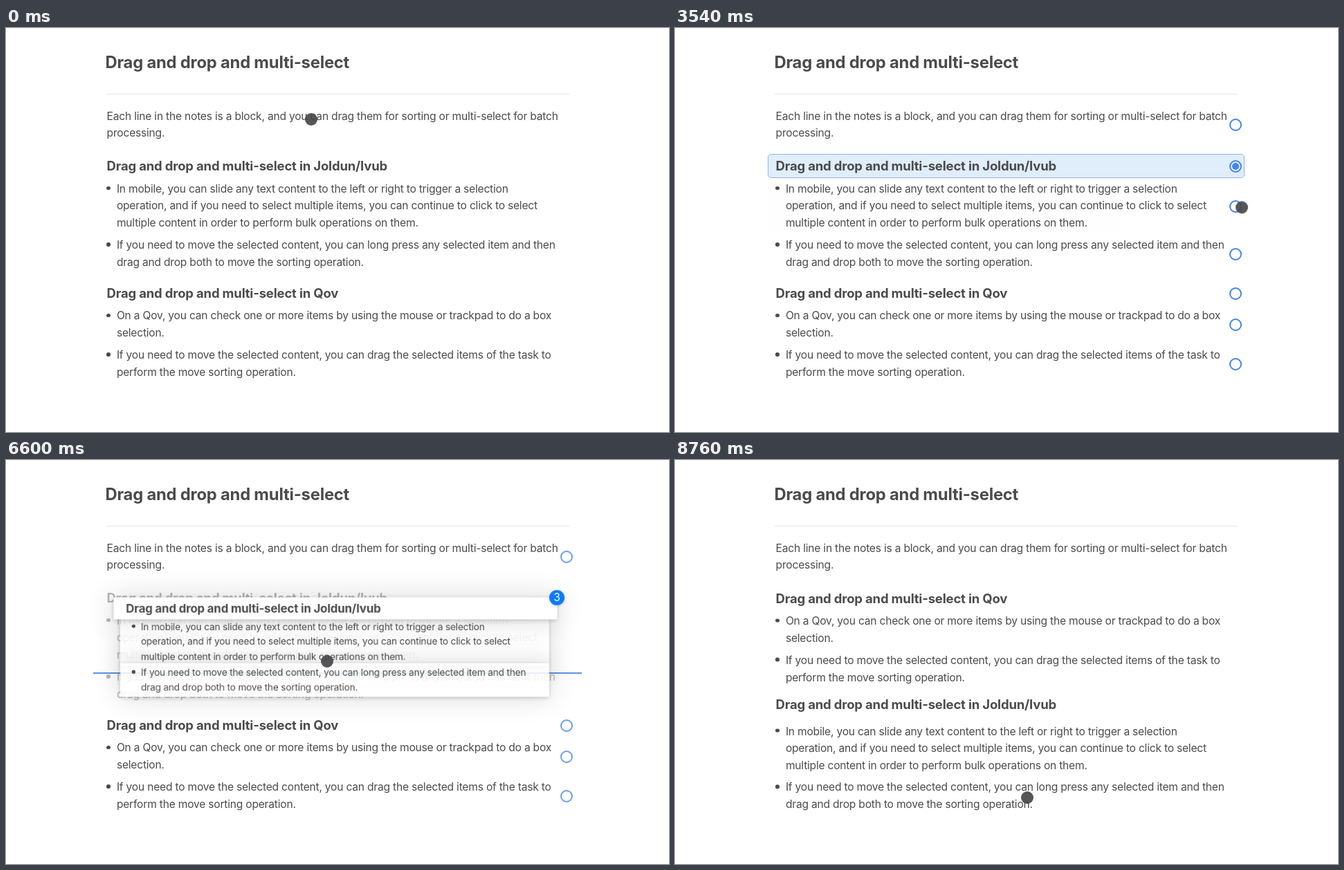
Write an HTML page that moves like this. It is 958 px wide and 584 px high and loops after 9 s.

```html
<!DOCTYPE html>
<html lang="en">
<head>
<meta charset="utf-8">
<title>Drag and drop and multi-select</title>
<style>
html, body { margin: 0; width: 100%; height: 100%; overflow: hidden; background: #fff; }
#stage {
  position: relative; width: 958px; height: 584px; overflow: hidden; background: #fff;
  color: #4b4b4d; font: 15.6px/24.6px Inter, "Liberation Sans", sans-serif;
  font-optical-sizing: none; letter-spacing: -.0138em; white-space: nowrap;
}
#stage *, #stage *::before, #stage *::after {
  box-sizing: border-box;
  animation-duration: 9s; animation-iteration-count: infinite; animation-timing-function: linear;
}
h1, h2 { margin: 0; font-weight: 700; letter-spacing: -.0095em; }
h1 { position: absolute; left: 143.5px; top: 35px; font-size: 23.8px; line-height: 30px; }
h2 { font-size: 18.5px; }
hr { position: absolute; left: 144px; top: 95px; width: 670px; height: 1px; margin: 0; border: 0; background: #e6e6e6; }

/* rows */
.row {
  position: absolute; left: 126px; width: 706px; top: var(--top); height: var(--h);
  display: flex; align-items: center; padding-left: 19.6px;
}
.text { position: relative; }
.item { padding-left: 33.9px; }
.item .text::before {
  content: ""; position: absolute; left: -14.6px; top: 8.2px;
  width: 5.6px; height: 5.6px; border-radius: 50%; background: currentColor;
}
.radio {
  position: absolute; left: 675px; top: 50%; width: 18px; height: 18px; margin-top: -9px;
  border: 2px solid #4483ee; border-radius: 50%; opacity: 0; animation-name: radios;
}
.move > .radio { animation-name: moveRadios; }
.move::before {
  content: ""; position: absolute; inset: 0 9px 0 8px; opacity: 0;
  border: 1px solid #8fb7ef; border-radius: 5px; background: #e0edfa; animation-name: var(--pick);
}
.move > .radio::after {
  content: ""; position: absolute; inset: 2px; border-radius: 50%;
  background: #4483ee; opacity: 0; animation-name: var(--pick);
}
.move > .text { animation-name: ghost; }
.swipe { animation-name: swipe; }
.stay { animation-name: rise; }

/* lifted copies */
.row.card {
  background: rgba(255, 255, 255, .85); opacity: 0; z-index: 1;
  animation-name: lift, show, shade;
}
.row.card.head { background: #fff; z-index: 3; }
.row.card.mid { animation-name: lift, show, shade, raise; }
.row.card.last { z-index: 2; }
.head { --a: translate(-3px, 15px) scale(.908); --b: translate(31.5px, 286.5px) scale(.44);
        --c: translate(3px, 167.5px) scale(.8995); --d: translate(0, 153.7px); }
.mid  { --a: translate(-4px, 5.5px) scale(.878); --b: translate(30px, 231.5px) scale(.277);
        --c: translate(2.5px, 166px) scale(.87); --d: translate(0, 159.5px); }
.last { --a: translate(-4px, -8.3px) scale(.878); --b: translate(30px, 161.7px) scale(.277);
        --c: translate(2.5px, 159.3px) scale(.87); --d: translate(0, 159.2px); }

#line { position: absolute; left: 126px; top: -1px; width: 706px; height: 2px; background: #5e92e4; animation-name: line; }
#badge {
  position: absolute; left: -11px; top: -11px; width: 22px; height: 22px; border-radius: 50%; z-index: 5;
  background: #0a7bff; color: #fff; text-align: center; line-height: 22px; letter-spacing: 0;
  box-shadow: 0 1px 4px rgba(0, 0, 0, .2); animation-name: badge, badgeShow;
}
#dot {
  position: absolute; left: -9px; top: -9px; width: 18px; height: 18px; border-radius: 50%; z-index: 6;
  background: rgba(72, 72, 75, .92); animation-name: dot;
}

@keyframes dot {
  0%, 6.67% { transform: translate(441px, 132px); animation-timing-function: ease-in; }
  9.33% { transform: translate(458px, 198px); animation-timing-function: ease-out; }
  10.67% { transform: translate(462px, 213px); animation-timing-function: ease-in-out; }
  12%, 14% { transform: translate(462px, 206px); }
  14.67%, 17.33% { transform: translate(462.3px, 206.3px); }
  18%, 20% { transform: translate(462px, 205.7px); }
  20.1%, 22% { transform: translate(462px, 205px); animation-timing-function: ease-in-out; }
  24.67% { transform: translate(412px, 207px); animation-timing-function: ease-in; }
  28% { transform: translate(557px, 214px); }
  32% { transform: translate(736px, 240px); animation-timing-function: ease-out; }
  37.33% { transform: translate(820px, 257px); }
  43.33% { transform: translate(817px, 264px); animation-timing-function: ease-in-out; }
  47.33% { transform: translate(816px, 303px); }
  49.33%, 53.33% { transform: translate(816px, 306px); animation-timing-function: ease-in-out; }
  60%, 72% { transform: translate(463px, 286px); }
  73.33% { transform: translate(464px, 291px); animation-timing-function: ease-in-out; }
  81.33%, 100% { transform: translate(509px, 488px); }
}
@keyframes swipe {
  0%, 22% { transform: none; animation-timing-function: ease-in-out; }
  24.67% { transform: translateX(-45px); animation-timing-function: ease-in; }
  28% { transform: translateX(-10px); animation-timing-function: ease-out; }
  30.67%, 100% { transform: none; }
}
@keyframes pick1 { 0%, 24.67% { opacity: 0; } 26%, 62.67% { opacity: 1; } 66%, 100% { opacity: 0; } }
@keyframes pick2 { 0%, 39.33% { opacity: 0; } 40.67%, 62.67% { opacity: 1; } 66%, 100% { opacity: 0; } }
@keyframes pick3 { 0%, 45.33% { opacity: 0; } 46.67%, 62.67% { opacity: 1; } 66%, 100% { opacity: 0; } }
@keyframes radios {
  0%, 24.67% { opacity: 0; } 26.67%, 66% { opacity: 1; }
  73.33% { opacity: .8; } 76%, 100% { opacity: 0; }
}
@keyframes moveRadios { 0%, 24.67% { opacity: 0; } 26.67%, 62.67% { opacity: 1; } 66%, 100% { opacity: 0; } }
@keyframes ghost {
  0%, 70% { opacity: 1; } 72%, 87.33% { opacity: .4; } 88.67%, 100% { opacity: 0; }
}
@keyframes rise {
  0%, 87.33% { transform: none; animation-timing-function: cubic-bezier(.3, .5, .3, 1); }
  92%, 100% { transform: translateY(-183.5px); }
}
@keyframes show { 0%, 62.67% { opacity: 0; } 64.67%, 100% { opacity: 1; } }
@keyframes raise { 0%, 87.33% { z-index: 1; } 87.34%, 100% { z-index: 4; } }
@keyframes lift {
  0%, 62.67% { transform: none; animation-timing-function: ease-out; }
  69%, 72% { transform: scale(1.02); }
  73.33% { transform: var(--a); animation-timing-function: ease-in-out; }
  81.33%, 87.33% { transform: var(--b); animation-timing-function: ease-out; }
  91.33% { transform: var(--c); animation-timing-function: ease-in-out; }
  97.33%, 100% { transform: var(--d); }
}
@keyframes shade {
  0%, 62.67%, 97.33%, 100% { box-shadow: 0 2px 7px rgba(0, 0, 0, 0), 0 0 42px 4px rgba(0, 0, 0, 0); }
  69%, 91.33% { box-shadow: 0 2px 7px rgba(0, 0, 0, .2), 0 0 42px 4px rgba(0, 0, 0, .13); }
}
@keyframes line {
  0%, 71.9% { transform: translateY(303px); opacity: 0; }
  72% { transform: translateY(303px); opacity: 1; }
  73.33% { transform: translateY(308px); animation-timing-function: ease-in-out; }
  81.33%, 87.33% { transform: translateY(506px); background: #5e92e4; opacity: 1; }
  91.33% { transform: translateY(512px); background: #ebebeb; opacity: 1; }
  94%, 100% { transform: translateY(512px); background: #ebebeb; opacity: 0; }
}
@keyframes badge {
  0%, 68% { transform: translate(839px, 182px) scale(.3); animation-timing-function: ease-out; }
  70%, 72% { transform: translate(839px, 182px); }
  73.33% { transform: translate(796px, 199px); animation-timing-function: ease-in-out; }
  81.33%, 100% { transform: translate(666px, 479px); }
}
@keyframes badgeShow { 0%, 68% { opacity: 0; } 69%, 82.67% { opacity: 1; } 84.67%, 100% { opacity: 0; } }
</style>
</head>
<body>
<div id="stage">
  <h1>Drag and drop and multi-select</h1>
  <hr>
  <div class="row" style="--top:113.3px;--h:54px">
    <div class="text">Each line in the notes is a block, and you can drag them for sorting or multi-select for batch<br>processing.</div>
  </div>
  <div class="row move swipe head" style="--top:182px;--h:35px;--pick:pick1">
    <h2 class="text">Drag and drop and multi-select in Joldun/Ivub</h2>
  </div>
  <div class="row item move mid" style="--top:218px;--h:79px;--pick:pick2">
    <div class="text">In mobile, you can slide any text content to the left or right to trigger a selection<br>operation, and if you need to select multiple items, you can continue to click to select<br>multiple content in order to perform bulk operations on them.</div>
  </div>
  <div class="row item move last" style="--top:299px;--h:55px;--pick:pick3">
    <div class="text">If you need to move the selected content, you can long press any selected item and then<br>drag and drop both to move the sorting operation.</div>
  </div>
  <div class="row stay" style="--top:366px;--h:35px">
    <h2 class="text">Drag and drop and multi-select in Qov</h2>
  </div>
  <div class="row item stay" style="--top:402px;--h:54px">
    <div class="text">On a Qov, you can check one or more items by using the mouse or trackpad to do a box<br>selection.</div>
  </div>
  <div class="row item stay" style="--top:458.5px;--h:54px">
    <div class="text">If you need to move the selected content, you can drag the selected items of the task to<br>perform the move sorting operation.</div>
  </div>
  <div id="line"></div>
  <div id="badge">3</div>
  <div id="dot"></div>
</div>
<script>
const stage = document.getElementById("stage");
const badge = document.getElementById("badge");

// each movable row gets a floating copy that is lifted and dropped
for (const row of document.querySelectorAll(".move")) {
  const card = row.cloneNode(true);
  card.classList.remove("move", "swipe");
  card.classList.add("card");
  stage.insertBefore(card, badge);
}
for (const row of document.querySelectorAll(".row:not(.card)")) {
  const radio = document.createElement("i");
  radio.className = "radio";
  row.append(radio);
}
</script>
</body>
</html>
```
